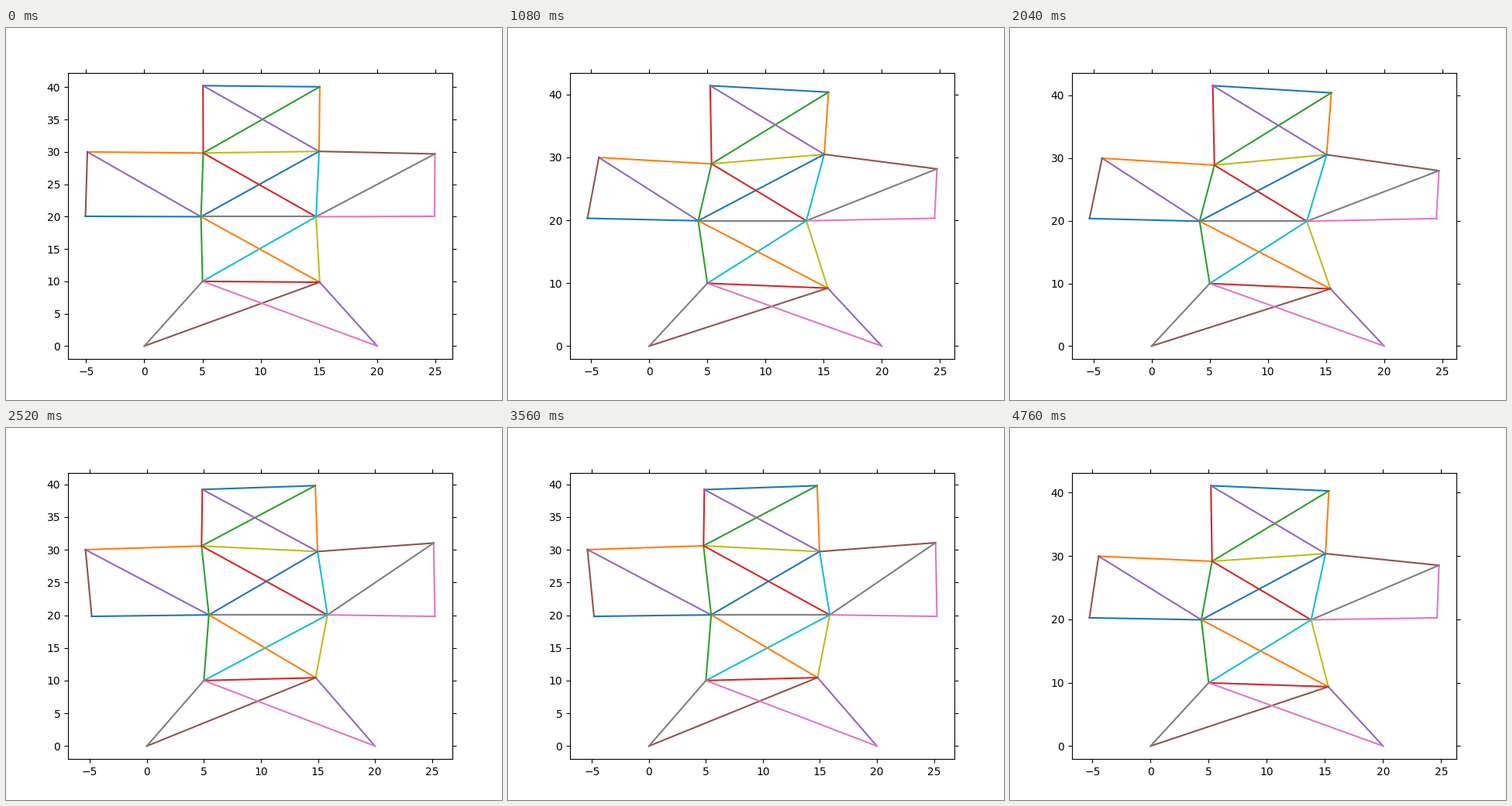
Write a matplotlib script that moves like this. It is 640x480 px and loops after 4800 ms.

```python
import matplotlib.pyplot as plt
import numpy as np
from matplotlib.animation import FuncAnimation

FRAMES = 120
INTERVAL = 40

# Joints A to N, row by row from the top
ROWS = [(40, (5, 15)), (30, range(-5, 26, 10)), (20, range(-5, 26, 10)),
        (10, (5, 15)), (0, (0, 20))]

# Each row bends as a polynomial across its width: sideways, upward
BEND = {
    40: ([0.18, 0.33], [-1.04, 0.88]),
    30: ([-0.31, 0.21], [-1.065, -0.33, 1.79, -0.20]),
    20: ([0.33, 0.38, -0.79, -1.24], [0.20, 0, -0.135]),
    10: ([0.36, 0.18], [-0.78, -0.41]),
    0: ([0], [0]),
}

# Drawn in this order, the bars take the default colour cycle
BARS = ("AB BE BD AD AE EF FJ FI DE EI EH DC DH DI "
        "CH CG JI IH IL IK HG HL HK KL LN LM KN KM").split()


def bend(x, y):
    across = (x - 10) / 10
    return [np.polyval(coeffs, across) for coeffs in BEND[y]]


def sway(k):
    return 0.29 + 0.92 * np.sin(0.27 * (k - 0.5))


def padded(values, margin=0.05):
    low, high = values.min(), values.max()
    pad = margin * (high - low)
    return low - pad, high + pad


rest = np.array([(x, y) for y, columns in ROWS for x in columns], float)
mode = np.array([bend(x, y) for x, y in rest])

fig, ax = plt.subplots(figsize=(6.4, 4.8), dpi=100)
ax.tick_params(top=True, right=True)
lines = [ax.plot([], [], lw=1.5)[0] for _ in BARS]


def update(k):
    joints = rest + sway(k) * mode
    for line, bar in zip(lines, BARS):
        ends = [ord(name) - ord("A") for name in bar]
        line.set_data(*joints[ends].T)
    ax.set_xlim(padded(joints[:, 0]))
    ax.set_ylim(padded(joints[:, 1]))
    return lines


anim = FuncAnimation(fig, update, frames=FRAMES, interval=INTERVAL,
                     repeat=True, repeat_delay=0, blit=False)
plt.show()
```
